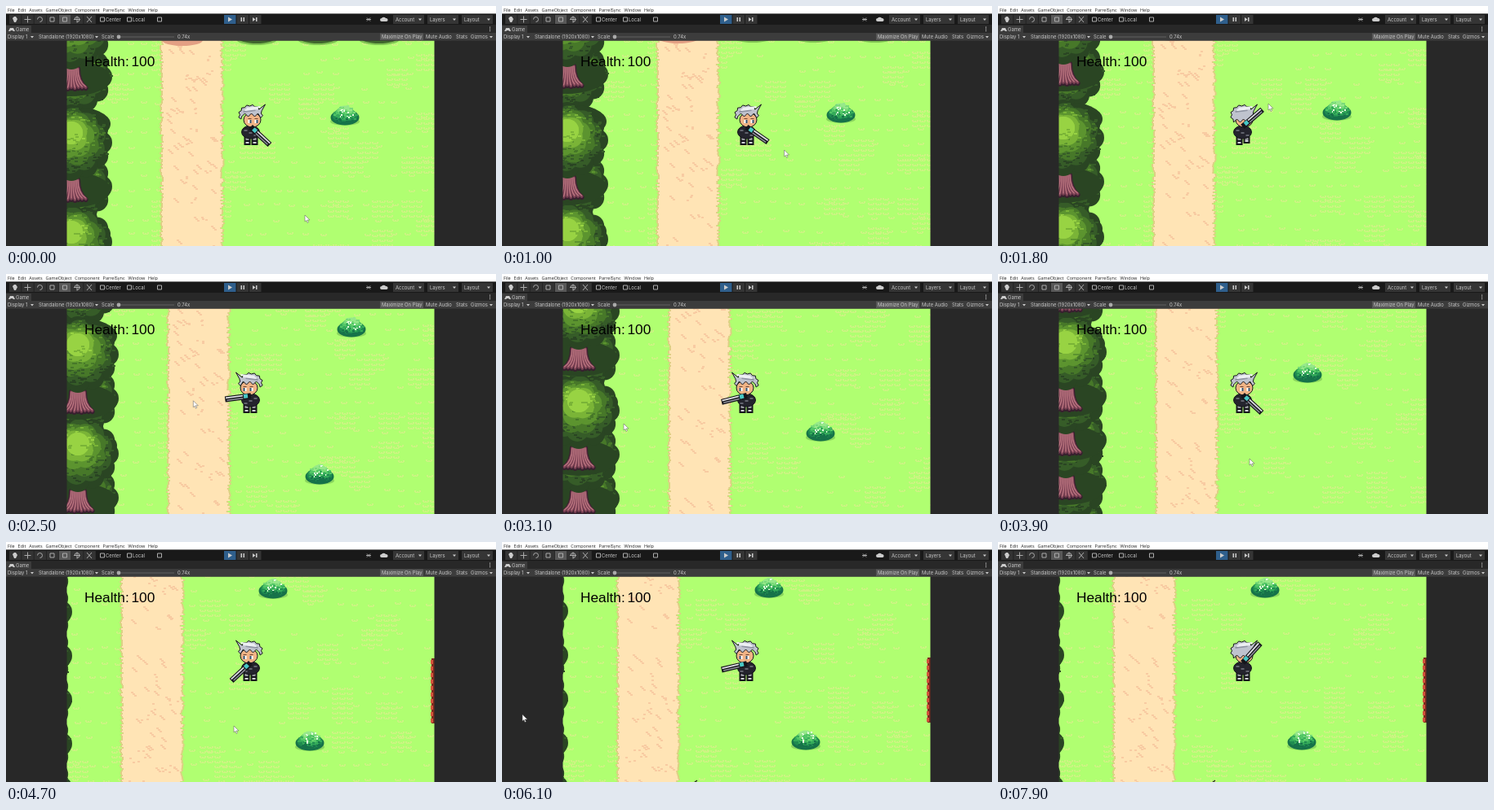
Animation of 600x295 px, one loop 8000 ms. Source, as an HTML page with a canvas:

```html
<!DOCTYPE html>
<html lang="en">
<head>
<meta charset="utf-8">
<title>Game view</title>
<style>
html, body { margin: 0; width: 100%; height: 100%; overflow: hidden; background: #282828; }
canvas, svg { position: absolute; left: 0; top: 0; width: 600px; height: 295px; }
text { font: 5.9px Inter, sans-serif; fill: #c8c8c8; }
.menu { font: 5.5px "Open Sans", sans-serif; fill: #222; word-spacing: 2.45px; }
.health { font: 17.3px "Liberation Sans", Arial, sans-serif; fill: #000; }
.icon { fill: none; stroke: #aaa; }
</style>
</head>
<body>
<canvas id="stage" width="600" height="295"></canvas>
<svg viewBox="0 0 600 295">
  <text class="health" x="96" y="74">Health:<tspan x="153.500">100</tspan></text>
  <g id="ui"></g>
  <path id="cursor" fill="#fff" stroke="#555" stroke-width=".5" d="M0 0v8l2-1.500 1 3 1.500-1-1.500-2.500h3z"/>
</svg>
<script>
const ctx = document.getElementById('stage').getContext('2d');
const cursor = document.getElementById('cursor');
const LOOP = 8000;

// Editor chrome
const parts = [];
const rect = (fill, x, y, w, h) => parts.push(`<rect fill="${fill}" x="${x}" y="${y}" width="${w}" height="${h}"/>`);
const label = (x, y, text, cls = '') => parts.push(`<text class="${cls}" x="${x}" y="${y}">${text}</text>`);
const path = (d, cls = '') => parts.push(`<path class="${cls}" fill="#ccc" d="${d}"/>`);
const arrow = (x, y) => path(`M${x} ${y}h4l-2 2.500z`);
const ring = (x, r = 3) => path(`M${x - r} 16.500a${r} ${r} 0 1 1 ${r} ${r}`, 'icon');
const plus = x => path(`M${x - 4} 16.500h8m-4-4v8`, 'icon');
const square = (x, s = 5) => path(`M${x - s / 2} ${16.5 - s / 2}h${s}v${s}h${-s}z`, 'icon');

rect('#fff', 0, 0, 600, 9.6);
label(2, 7, 'File Edit Assets GameObject Component ParrelSync Window Help', 'menu');
rect('#191919', 0, 9.6, 600, 13.4);
rect('#282828', 0, 23, 600, 10);
rect('#3c3c3c', 0, 24, 31, 9);
rect('#3c3c3c', 0, 33, 600, 9.5);

for (let i = 0; i < 7; i++) rect(i === 4 ? '#585858' : '#333', 4 + i * 15.2, 11, 14.6, 11);
plus(26.5);
ring(41.5);
[56.5, 72, 118, 151, 188].forEach(x => square(x));
ring(87);
plus(87);
path('M8 15l2-2h2l2 3-2 4h-2z');
path('M99 13l6 7m0-7l-6 7', 'icon');
label(122, 18.7, 'Center');
label(155, 18.7, 'Local');

for (let i = 0; i < 3; i++) rect(i ? '#353535' : '#2f5f8c', 267 + i * 15.5, 11, 14.5, 11);
path('M272 13.500l5 3-5 3z');
path('M287.500 14h1.500v5h-1.500zm3 0h1.500v5h-1.500z');
path('M302 14l3.500 2.500-3.500 2.500zm4 0h1.500v5h-1.500z');

path('M441 16.500h6m-5-2l4 4m0-4l-4 4', 'icon');
path('M460 19a2 2 0 0 1 0-4 3 3 0 0 1 5 0 2 2 0 0 1 1 4z');
['Account', 'Layers', 'Layout'].forEach((text, i) => {
  const x = 474 + i * 42;
  rect('#353535', x, 11, 38, 11);
  label(x + 3, 18.7, text);
  arrow(x + 31, 15.5);
});

path('M5 27h4l2 4h-2l-1-1h-2l-1 1h-2z');
label(12, 31, 'Game');
rect('#585858', 458, 33.5, 53, 8.5);
rect('#606060', 137, 37.5, 69, 1);
parts.push('<circle cx="138" cy="38" r="2.400" fill="#aaa"/>');
[[2, 'Display 1'], [40, 'Standalone (1920x1080)'], [117, 'Scale'], [210, '0.74x'], [460, 'Maximize On Play'],
  [514, 'Mute Audio'], [551, 'Stats'], [569, 'Gizmos']].forEach(([x, text]) => label(x, 40, text));
[30, 109, 592].forEach(x => arrow(x, 37));
for (let i = 0; i < 3; i++) rect('#bbb', 592, 25.5 + i * 2.2, 1.2, 1.2);
document.getElementById('ui').innerHTML = parts.join('');

// time, road's left edge, y of the middle bush
const camera = [[0, 190, 314], [1800, 190, 308], [3100, 204, 192], [3900, 193, 120],
  [4700, 141, 56], [4800, 141, 55], [LOOP, 141, 55]];
// time, pointer tip
const pointer = [[0, 366, 257], [1800, 331, 120], [3100, 149, 184], [3900, 308, 227],
  [4700, 279, 226], [6100, 25, 212], [6400, 25, 212], [7200, 345, -12], [LOOP, 345, -12]];

let seed = 41;
const rnd = (a = 0, b = 1) => {
  seed = seed * 16807 % 2147483647;
  return a + (b - a) * seed / 2147483647;
};

function track(keys, t, ease = u => u) {
  const i = Math.max(1, keys.findIndex(k => k[0] > t));
  const a = keys[i - 1], b = keys[i];
  const u = ease((t - a[0]) / (b[0] - a[0]));
  return [1, 2].map(n => a[n] + (b[n] - a[n]) * u);
}
const smooth = u => u * u * (3 - 2 * u);

// Drawing helpers, shared by the map and the stage
function box(c, color, x, y, w, h) {
  c.fillStyle = color;
  c.fillRect(Math.round(x), Math.round(y), w, h);
}
function oval(c, color, x, y, rx, ry = rx, outline) {
  c.fillStyle = color;
  c.beginPath();
  c.ellipse(x, y, rx, ry, 0, 0, 7);
  c.fill();
  if (outline) {
    c.strokeStyle = outline;
    c.lineWidth = 1;
    c.stroke();
  }
}
function line(c, color, width, x1, y1, x2, y2) {
  c.strokeStyle = color;
  c.lineWidth = width;
  c.beginPath();
  c.moveTo(x1, y1);
  c.lineTo(x2, y2);
  c.stroke();
}

// The map is painted once; its origin is the road's left edge at the middle bush.
const OX = 135, OY = 290, SIZE = 560;
const map = document.createElement('canvas');
map.width = map.height = SIZE;
const g = map.getContext('2d');
g.translate(OX, OY);

function tuft(x, y) {
  for (let i = -1; i < 2; i++) {
    box(g, '#cdf383', x + i * 3, y - (i ? 1 : 0), 2, 2);
    box(g, '#cdf383', x + i * 2, y + 1, 2, 1);
  }
}

function grass() {
  const cell = 18;
  box(g, '#b0ff71', -OX, -OY, SIZE, SIZE);
  for (let x = -OX; x < 400; x += cell) {
    for (let y = -OY; y < 260; y += cell) {
      if (rnd() < .7) tuft(x + rnd(4, 9), y + rnd(3, 6));
      if (rnd() < .07) for (let i = 0; i < 12; i++) tuft(x + i % 3 * 9, y + Math.floor(i / 3) * 6);
    }
  }
}

function road() {
  for (let y = -OY; y < 270; y += 2) {
    const l = rnd(-1, 2), r = rnd(73, 77);
    box(g, '#dcd084', l - 1, y, r - l + 2, 2);
    box(g, '#ffe4b5', l + 1, y, r - l - 2, 2);
  }
  for (let i = 0; i < 100; i++) {
    const x = rnd(6, 64), y = rnd(-OY, 260), speckled = i % 4 === 0;
    for (let n = 0; n < 3; n++) {
      if (speckled) box(g, '#f8cba2', x + rnd(-4, 8), y + rnd(-4, 5), 3, 2);
      else box(g, '#f8cba2', x + n * 2, y + n * 2, 3, 2);
    }
  }
}

function bush(x, y) {
  const tones = ['#167249', '#1f8b50', '#35ab5a', '#52c667', '#78da78', '#96e88a'];
  oval(g, '#8bd65e', x, y + 9, 18, 5);
  tones.forEach((tone, i) => oval(g, tone, x, y + 4 - i * 2, 17.5 - i * 2, 9.5 - i));
  for (let i = 0; i < 90; i++) {
    const a = rnd(0, 6.3), r = Math.sqrt(rnd()), dy = Math.sin(a) * r * 11;
    const level = Math.max(0, Math.min(5, Math.floor((8 - dy) / 3 + rnd(-1, 1))));
    box(g, tones[level], x + Math.cos(a) * r * (14 + dy / 4) - 1, y + dy, 3, 2);
    if (i % 5 === 0) box(g, '#e4fbdf', x + Math.cos(a) * r * 11, y + dy * .7 - 3, 2, 2);
  }
}

function trunk(x, y) {
  g.lineCap = 'round';
  ['#38202f', '#7a4053', '#bb7580'].forEach((color, n) => {
    for (let i = -4; i <= 4; i++) {
      g.strokeStyle = color;
      g.lineWidth = 6 - n * 2.3;
      g.beginPath();
      g.moveTo(x + i * 2, y - 16);
      g.quadraticCurveTo(x + i * 2, y, x + i * 4.4, y + 8 - n + i % 2 * i % 3);
      g.stroke();
    }
  });
}

function tree(base) {
  const x = -110, y = base - 62;
  const tones = ['#2a4523', '#365c28', '#477829', '#5c942f', '#7ab437', '#98d343'];
  oval(g, '#2a4523', x, base - 4, 48, 22);
  trunk(x, base);
  // Rings of leafy lobes, brighter towards the crown
  tones.forEach((tone, i) => {
    const reach = 1 - i / 5, lobes = 12 - i * 2;
    for (let n = 0; n < lobes; n++) {
      const a = n / lobes * 6.28 + i;
      const lx = x + Math.cos(a) * 36 * reach, ly = y - i * 2.4 + Math.sin(a) * 33 * reach;
      oval(g, tone, lx, ly, 14);
      for (let k = 0; k < 12; k++) {
        const b = rnd(0, 6.3), lit = Math.sin(b) < 0 ? 1 : -1;
        const leaf = tones[Math.max(0, Math.min(5, i + lit))];
        const r = rnd(5, 13);
        box(g, leaf, lx + Math.cos(b) * r - 2, ly + Math.sin(b) * r - 1, 4, 2);
      }
    }
  });
}

grass();
road();
oval(g, '#e3a084', 26, -272, 25, 7);
for (let i = 0; i < 3; i++) {
  oval(g, '#7fc252', 117 + i * 75, -273, 25, 7);
  oval(g, '#40682d', 117 + i * 75, -275, 23, 7);
}
bush(225, -181);
bush(186, 0);
bush(231, 187);
[308, 254, 200, 146, 92, -30, -165, 38, -84, -221].forEach(tree);
for (let y = 87; y < 167; y += 8) {
  box(g, '#7d2a20', 380, y, 12, 8);
  box(g, '#d3543b', 379, y + 2, 3, 5);
}

const INK = '#15151b';

function hair(back) {
  const spikes = 8;
  ctx.beginPath();
  for (let i = 0; i <= spikes * 2; i++) {
    const a = Math.PI * (.85 + 1.25 * i / (spikes * 2));
    const r = 13 + i % 2 * 2;
    ctx.lineTo(Math.cos(a) * r, -11 + Math.sin(a) * r * .85);
    if (i === 12) ctx.lineTo(18, -24);
  }
  for (let i = 0; i < 6; i++) ctx.lineTo(9 - i * 4, (back ? -6 : -13) + i % 2 * 4);
  ctx.closePath();
  ctx.fillStyle = '#bfc3ce';
  ctx.fill();
  ctx.strokeStyle = INK;
  ctx.lineWidth = 1;
  ctx.stroke();
  for (let i = 0; i < 3; i++) line(ctx, i ? '#eef0f4' : '#8f94a3', 2, -9 + i * 2, -15 - i * 2, 6 + i * 3, -17 - i * 2);
}

function hero(aim, step) {
  const back = Math.sin(aim) < 0;
  const tilt = Math.asin(Math.sin(aim));
  ctx.save();
  ctx.translate(299.5, 145);
  ctx.scale(Math.cos(aim) < 0 ? -1 : 1, 1);

  [-1, 1].forEach(s => {
    const lift = Math.min(0, s * step);
    box(ctx, INK, s * 4.5 - 4, 15, 8, 11 + lift);
    box(ctx, '#96979f', s * 4.5 - 2, 17, 4, 3);
    box(ctx, '#d2d3d8', s * 4.5 - 2, 22 + lift, 4, 2);
  });
  oval(ctx, '#24242d', 0, 10, 11, 8, INK);
  for (let i = 0; i < 3; i++) box(ctx, '#62646f', -8 + i * 6, 7 + i * 3, 4, 2);

  oval(ctx, '#f0b385', 2, -5, 10.5, 9, INK);
  if (!back) {
    [0, 8].forEach(x => {
      box(ctx, '#fff', x - 3, -5, 4, 4);
      box(ctx, '#34506b', x - 1, -5, 2, 4);
      box(ctx, '#704535', x - 3, -7, 4, 1);
    });
  }
  hair(back);

  ctx.translate(1.5, back ? 2 : 5);
  ctx.rotate(Math.max(-.84, Math.min(.75, tilt)));
  ctx.lineCap = 'butt';
  line(ctx, INK, 7, -2, 0, 30, 0);
  line(ctx, '#dddee3', 1.8, 8, -1.5, 29, -1.5);
  line(ctx, '#8f919c', 1.5, 8, 1.6, 28, 1.6);
  box(ctx, '#48c7c5', 2, -3, 5, 5);
  ctx.restore();
}

function frame(now) {
  const t = now % LOOP;
  const [rx, by] = track(camera, t);
  const [cx, cy] = track(pointer, t, smooth);
  ctx.fillStyle = '#282828';
  ctx.fillRect(0, 0, 600, 295);
  ctx.save();
  ctx.beginPath();
  ctx.rect(74.5, 42.5, 450, 253);
  ctx.clip();
  ctx.drawImage(map, Math.round(rx) - OX, Math.round(by) - OY);
  if (t > 5900) {
    const x = 237 + (t - 6100) * .015;
    line(ctx, '#26301f', 1.5, x - 2, 296, x + 2, 293);
  }
  const step = t > 1800 && t < 4800 ? 2 * Math.sin((t - 3100) / 400 * 2 * Math.PI) : 0;
  hero(Math.atan2(cy - 146, cx - 301), step);
  ctx.restore();
  cursor.setAttribute('transform', `translate(${cx} ${cy})`);
  cursor.style.display = cy < -9 ? 'none' : '';
}

const start = performance.now();
function loop() {
  frame(performance.now() - start);
  requestAnimationFrame(loop);
}
loop();
</script>
</body>
</html>
```
